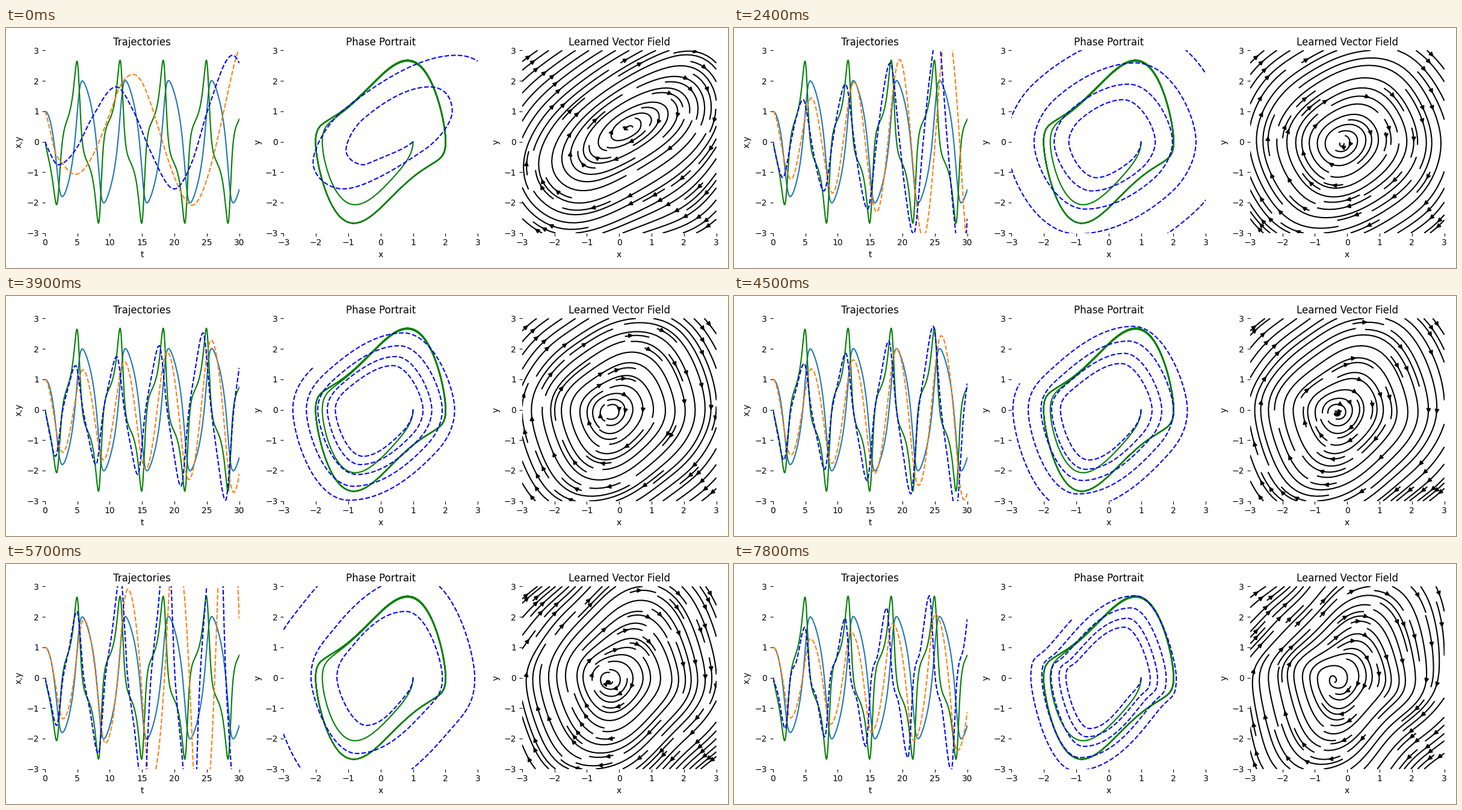
A matplotlib script that plays this animation: 1200 px wide and 400 px high, repeating every 8 s.

```python
import numpy as np
import matplotlib.pyplot as plt
from matplotlib.animation import FuncAnimation
from matplotlib.collections import PathCollection

STEPS = 27
HOLD = 3            # ticks of 100 ms per training step
TICKS = 80
LIM = 3

# Key points of the training run
KEYS = [0, 4, 8, 11, 15, 19, 26]
PERIOD = [9, 3.57, 3.12, 3.06, 3.12, 3.13, 3.03]     # first half turn
GROWTH = [.27, .355, .157, .083, .092, .22, .078]    # per half turn
SIZE = [1.42, 1.42, 1.23, 1.24, 1.35, 1.45, 1.25]    # first x extreme
RATIO = [.78, .78, .96, 1.08, 1.12, 1.15, 1.28]      # y size over x size
MIDDLE = [.35, .02, 0, -.07, -.14, .1, -.07]

t = np.linspace(0, 30, 1000)
half_turn = np.arange(12)
rng = np.random.default_rng(4)
W = rng.normal(0, .5, (2, 60))
BIAS = rng.normal(0, 1, 60)


def key(values, step):
    return np.interp(step, KEYS, values)


def mix(step, trained, untrained):
    """Fade from the untrained value over the first four steps."""
    early = max(0, 1 - step / 4)
    return trained + early * (np.asarray(untrained) - trained)


def hermite(knots, values, slopes):
    i = np.clip(np.searchsorted(knots, t, side="right") - 1, 0, len(knots) - 2)
    h = knots[i + 1] - knots[i]
    u = (t - knots[i]) / h
    return ((1 + 2 * u) * (1 - u) ** 2 * values[i]
            + u * (1 - u) ** 2 * h * slopes[i]
            + u ** 2 * (3 - 2 * u) * values[i + 1]
            + u ** 2 * (u - 1) * h * slopes[i + 1])


def weave(first, *rows):
    return np.concatenate([[first], np.stack(rows, 1).ravel()])


def shifted(values):
    return np.concatenate([[0], values[:-1]])


def true_orbit():
    """Van der Pol oscillator by RK4."""
    def f(p):
        return np.array([p[1], (1 - p[0] ** 2) * p[1] - p[0]])

    h = t[1]
    orbit = [np.array([1.0, 0.0])]
    for _ in t[1:]:
        p = orbit[-1]
        k1 = f(p)
        k2 = f(p + h / 2 * k1)
        k3 = f(p + h / 2 * k2)
        k4 = f(p + h * k3)
        orbit.append(p + h / 6 * (k1 + 2 * k2 + 2 * k3 + k4))
    return np.array(orbit).T


def pace(step):
    """dx/dt per unit of y."""
    return mix(step, .88, .33)


def fitted_orbit(step):
    """Growing spiral, splined through its turning points."""
    k = half_turn
    period, growth = key(PERIOD, step), key(GROWTH, step)
    middle = key(MIDDLE, step)
    stretch = mix(step, .3 * growth, 0)
    lag = mix(step, .46 - .0075 * step, .3)
    skew = mix(step, .26 + .006 * step, .62)
    shoulder = mix(step, .64 - .0125 * step, .5)

    tx = mix(step, .89, .52) * period + period * k + stretch * k ** 2
    ty = tx - lag * (period + 2 * stretch * k)
    swing = -(-1.0) ** k * key(SIZE, step) * np.exp(growth * k)
    x = middle + swing
    y = middle + key(RATIO, step) * swing

    xs = hermite(weave(0, ty, tx),
                 weave(1, middle + skew * swing, x),
                 weave(mix(step, 0, -.5), pace(step) * y, 0 * x))

    turn = mix(step, 0, .5 * y + .1)
    turn = np.broadcast_to(turn, y.shape)
    t0, y0 = shifted(tx), shifted(turn)
    knots = weave(0, t0 + .4 * (ty - t0), ty, tx)
    values = weave(0, y0 + shoulder * (y - y0), y, turn)
    slopes = np.gradient(values, knots)
    slopes[2::3] = 0
    return xs, hermite(knots, values, slopes)


def features(p):
    return np.concatenate(
        [p, np.ones(p.shape[:-1] + (1,)), np.tanh(p @ W + BIAS)], -1)


def anchors(step):
    """Fixed point, and flow near the border in mirrored pairs."""
    centre = mix(step, np.array([-.05 - .017 * step, -.1]), [.1, .18])
    spots = np.array([[-2.7, 2.7], [2.7, 2.7], [-2.7, 1.2]])
    angle = np.radians([mix(step, 46 - .3 * step, 38),
                        -40 - 1.1 * step,
                        mix(step, 75 - step, 53)])
    push = 3 * pace(step) * np.stack([np.cos(angle), np.sin(angle)], 1)
    return (np.vstack([centre, spots, -spots]),
            np.vstack([[0, 0], push, -push]))


def fitted_field(step, orbit, grid):
    """Ridge fit of a tanh layer to the orbit's velocity."""
    pos = np.stack(orbit, 1)
    vel = np.gradient(pos, t, axis=0)
    inside = np.abs(pos).max(1) < LIM
    spots, push = anchors(step)

    p = np.vstack([pos[inside], spots])
    v = np.vstack([vel[inside], push])
    weight = np.ones((len(p), 1))
    weight[-len(spots):] = 8
    a = features(p) * weight
    coef = np.linalg.solve(a.T @ a + np.eye(a.shape[1]), a.T @ (v * weight))
    flow = features(grid) @ coef
    return flow / np.linalg.norm(flow, axis=-1, keepdims=True)


def add_stream(ax, gx, gy, flow):
    """Streamlines, with all arrowheads gathered in one collection."""
    lines = ax.streamplot(gx, gy, flow[..., 0], flow[..., 1], color="black",
                          arrowsize=fig.dpi / 72).lines
    heads = [p.get_path() for p in ax.patches]
    for p in list(ax.patches):
        p.remove()
    arrows = PathCollection(heads, facecolor="black", edgecolor="black",
                            linewidth=1.5, zorder=2.1,
                            transform=ax.transData)
    ax.add_collection(arrows, autolim=False)
    for artist in (lines, arrows):
        artist.set_visible(False)
    return lines, arrows


def panel(place, title, xlabel, ylabel, xlim):
    ax = fig.add_subplot(1, 3, place, frameon=False)
    ax.set_title(title)
    ax.set_xlabel(xlabel)
    ax.set_ylabel(ylabel)
    ax.set_xlim(xlim)
    ax.set_ylim(-LIM, LIM)
    return ax


fig = plt.figure(figsize=(12, 4), dpi=100, facecolor="white")
ax_traj = panel(1, "Trajectories", "t", "x,y", (0, 30))
ax_phase = panel(2, "Phase Portrait", "x", "y", (-LIM, LIM))
ax_field = panel(3, "Learned Vector Field", "x", "y", (-LIM, LIM))
fig.tight_layout()

true_x, true_y = true_orbit()
ax_traj.plot(t, true_x, "C0-", t, true_y, "g-")
ax_phase.plot(true_x, true_y, "g-")
line_x, line_y = ax_traj.plot(t, true_x, "C1--", t, true_y, "b--")
line_phase, = ax_phase.plot(true_x, true_y, "b--")

gy, gx = np.mgrid[-3:3:21j, -3:3:21j]
grid = np.stack([gx, gy], -1)
orbits = [fitted_orbit(s) for s in range(STEPS)]
streams = [add_stream(ax_field, gx, gy, fitted_field(s, o, grid))
           for s, o in enumerate(orbits)]


def update(tick):
    step = tick // HOLD
    x, y = orbits[step]
    line_x.set_ydata(x)
    line_y.set_ydata(y)
    line_phase.set_data(x, y)
    for s, stream in enumerate(streams):
        for artist in stream:
            artist.set_visible(s == step)
    return line_x, line_y, line_phase, *streams[step]


anim = FuncAnimation(fig, update, frames=TICKS, interval=100, repeat=True,
                     repeat_delay=0, blit=False)
plt.show()
```
